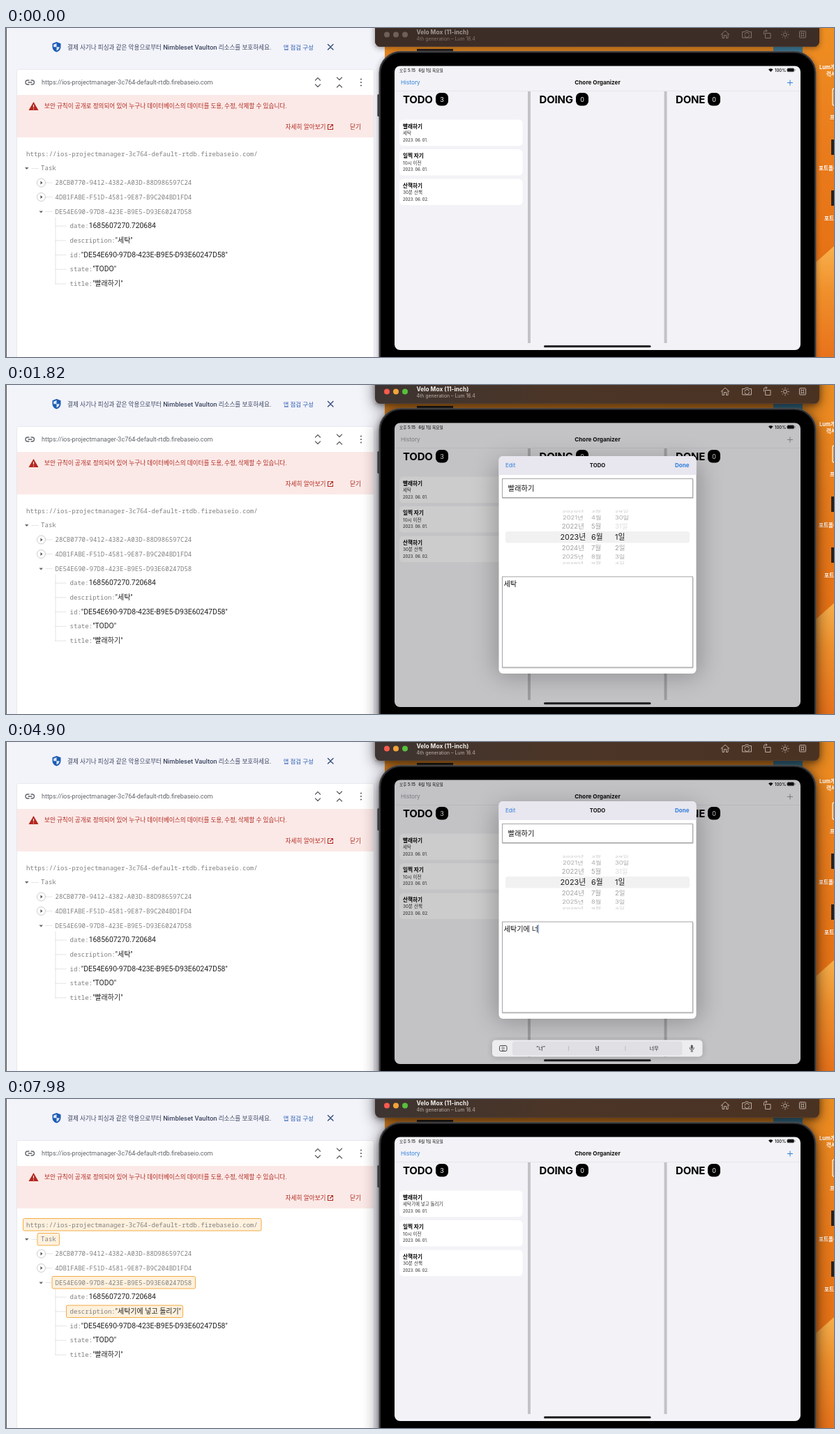
Write an HTML page that moves like this. It is 1187x472 px and loops after 8000 ms.

```html
<!DOCTYPE html>
<html lang="ko">
<head>
<meta charset="utf-8">
<title>Task sync</title>
<style>
html, body { margin: 0; width: 100%; height: 100%; overflow: hidden; background: #f3f3fa; }
svg { display: block; width: 1187px; height: 472px; }
:root { --spring: linear(0, .06 5%, .2 10%, .35 15%, .49 20%, .71 30%, .845 40%, .918 50%, .959 60%, .99 80%, 1); }
text { font-family: Inter, "Noto Sans CJK KR", "Noto Sans CJK", sans-serif; white-space: pre; }
.web text { font-family: Roboto, "Noto Sans CJK KR", "Noto Sans CJK", sans-serif; }
.web .mono { font-family: "Noto Sans Mono", "Liberation Mono", monospace; font-size: 9.07px; fill: #808080; }
.b { font-weight: 700; }
.m { font-weight: 500; }
.mid { text-anchor: middle; }
.line { fill: none; stroke-linecap: round; stroke-linejoin: round; }
.anim { animation: 8s linear infinite; }
.idle { animation-name: idle; }
.awake { animation-name: awake; }
.heading { animation-name: heading; }
.sheet { animation-name: sheet; }
.dim { animation-name: dim; }
.tint { animation-name: tint; }
.keys { animation-name: keys; }
.caret { animation-name: caret; }
.flash { animation-name: flash; }
.done { animation-name: done; }
@keyframes idle { 0%, .8% { opacity: 1; } 1.7%, 100% { opacity: 0; } }
@keyframes awake { 0%, .8% { opacity: 0; } 1.7%, 100% { opacity: 1; } }
@keyframes heading { 0%, .8% { opacity: .55; } 1.7%, 100% { opacity: 1; } }
@keyframes sheet {
  0% { transform: translateY(365px); }
  14.44% { transform: translateY(365px); animation-timing-function: var(--spring); }
  22.56% { transform: translateY(0); }
  38.9% { transform: translateY(0); animation-timing-function: var(--spring); }
  47% { transform: translateY(-17px); }
  95% { transform: translateY(-17px); animation-timing-function: var(--spring); }
  99.7%, 100% { transform: translateY(385px); }
}
@keyframes dim {
  0% { opacity: 0; }
  14.44% { opacity: 0; animation-timing-function: var(--spring); }
  22.56% { opacity: 1; }
  95% { opacity: 1; animation-timing-function: var(--spring); }
  99.7%, 100% { opacity: 0; }
}
@keyframes tint {
  0% { color: #2f7fdc; }
  14.44% { color: #2f7fdc; animation-timing-function: var(--spring); }
  20% { color: #98989d; }
  95% { color: #98989d; animation-timing-function: var(--spring); }
  99.7%, 100% { color: #2f7fdc; }
}
@keyframes keys {
  0% { transform: translateY(42px); }
  38.9% { transform: translateY(42px); animation-timing-function: var(--spring); }
  47% { transform: translateY(0); }
  95% { transform: translateY(0); animation-timing-function: var(--spring); }
  99.7%, 100% { transform: translateY(42px); }
}
@keyframes caret {
  0%, 39% { opacity: 0; }
  39.6%, 84.2% { opacity: 1; }
  86.8%, 89.5% { opacity: 0; }
  91%, 100% { opacity: 1; }
}
@keyframes flash { 0%, 97.99% { opacity: 0; } 98%, 100% { opacity: 1; } }
@keyframes done { 0%, 92.74% { opacity: 1; } 92.75%, 100% { opacity: .4; } }
</style>
</head>
<body>
<svg viewBox="0 0 1187 472">
  <defs>
    <linearGradient id="sky" x2="0" y2="1">
      <stop offset="0" stop-color="#ee8f22"/><stop offset=".35" stop-color="#ea7c1c"/><stop offset="1" stop-color="#e2690f"/>
    </linearGradient>
    <linearGradient id="ridge" x2="0" y2="1">
      <stop offset="0" stop-color="#f8b04c"/><stop offset=".4" stop-color="#f0902c"/><stop offset="1" stop-color="#e8721a"/>
    </linearGradient>
    <linearGradient id="bar">
      <stop offset="0" stop-color="#3d3431"/><stop offset=".4" stop-color="#4b3527"/><stop offset="1" stop-color="#4a3222"/>
    </linearGradient>
    <clipPath id="screen"><rect x="557" y="54.5" width="582" height="407.5" rx="8"/></clipPath>
    <filter id="blur" x="-20%" y="-20%" width="140%" height="140%"><feGaussianBlur stdDeviation="11"/></filter>
    <filter id="soft" x="-20%" y="-20%" width="140%" height="140%"><feGaussianBlur stdDeviation="4"/></filter>
    <filter id="wide" x="-30%" y="-30%" width="160%" height="160%"><feGaussianBlur stdDeviation="16"/></filter>
  </defs>

  <!-- desktop -->
  <rect x="540" width="647" height="472" fill="url(#sky)"/>
  <path d="M1187 313 1160 337V472H1187Z" fill="url(#ridge)"/>
  <path d="M589 30H641V36H589ZM1183 160H1187V182H1183ZM1183 233H1187V255H1183Z" fill="#26221f"/>
  <rect x="1100" y="26" width="42" height="10" fill="#3f7f9c"/>
  <rect x="1185" y="87" width="14" height="24" rx="2" fill="#d8822e" stroke="#f5e8dc" stroke-width="1.5"/>
  <g class="b" font-size="7.6" fill="#fff">
    <text x="1166" y="59">Lum개발</text><text x="1176" y="69">력서</text>
    <text x="1181" y="131">프로</text><text x="1165" y="204">포트폴리오</text><text x="1173" y="276">포트</text>
  </g>

  <!-- browser -->
  <g class="web">
    <rect width="543" height="472" fill="#f3f3fa"/>
    <rect width="1" height="472" fill="#5b5b62"/>
    <rect x="15.5" y="59.5" width="512" height="420" rx="3" fill="#fff" stroke="#e8e8ee"/>
    <path d="M72.500 20 78.500 22.300V27C78.500 30.800 76 33.400 72.500 34.500 69 33.400 66.500 30.800 66.500 27V22.300Z" fill="#1c5cb4"/>
    <path d="M72.500 22V27.200H76.800C76.400 29.800 74.800 31.700 72.500 32.600V27.200H68.200V23.700Z" fill="#dbe7f8"/>
    <text x="88" y="30.500" font-size="8.600" fill="#3c4760">결제 사기나 피싱과 같은 악용으로부터 <tspan class="m" font-size="9.400">Nimbleset Vaulton</tspan> 리소스를 보호하세요.</text>
    <text x="397.500" y="30.500" font-size="8.500" class="m" fill="#2a5cb0">앱 점검 구성</text>
    <path class="line" d="M461.500 23.500 469 31M469 23.500 461.500 31" stroke="#2b4672" stroke-width="1.300"/>

    <g class="line" stroke="#5f6368" stroke-width="1.300">
      <path d="M33 75H31A3 3 0 0 0 31 81H33M36 75H37.500A3 3 0 0 1 37.500 81H36M32 78H37"/>
      <path d="M443.500 75 447 71.500 450.500 75M443.500 81 447 84.500 450.500 81M474.500 71 478 74.500 481.500 71M474.500 85 478 81.500 481.500 85"/>
    </g>
    <path d="M509 73.500V73.510M509 78V78.010M509 82.500V82.510" stroke="#5f6368" stroke-width="2.200" stroke-linecap="round"/>
    <text x="51" y="81" font-size="9" fill="#5f6368">https://ios-projectmanager-3c764-default-rtdb.firebaseio.com</text>

    <rect x="16" y="96" width="511" height="61" fill="#fbe9e7"/>
    <path d="M39.500 106 46.500 118H32.500Z" fill="#b3261e"/>
    <path d="M39.500 110V114M39.500 115.500V116.700" stroke="#fbe9e7" stroke-width="1.200"/>
    <g fill="#b0281f">
      <text x="55" y="114.500" font-size="8.600">보안 규칙이 공개로 정의되어 있어 누구나 데이터베이스의 데이터를 도용, 수정, 삭제할 수 있습니다.</text>
      <text x="400.500" y="144.500" font-size="8.700" class="m">자세히 알아보기</text>
      <text x="493" y="144.500" font-size="8.700" class="m">닫기</text>
    </g>
    <path class="line" d="M464 138.500H461.500V145.500H468.500V143M466 138.500H468.500V141M468.300 138.700 464.500 142.500" stroke="#b0281f" stroke-width="1.100"/>

    <g class="anim flash" fill="#fef1de" stroke="#f2ab44">
      <rect x="24.500" y="171.500" width="341.500" height="17.500" rx="2"/>
      <rect x="45" y="192.500" width="31.500" height="17.500" rx="2"/>
      <rect x="66" y="254.500" width="205.500" height="17.500" rx="2"/>
      <rect x="86.500" y="296" width="167" height="17.500" rx="2"/>
    </g>
    <g class="line" stroke="#d8d8d8" stroke-width=".8" stroke-dasharray="1 1">
      <path d="M37 201.500H46M57 222H66M57 242.500H66M57 263.500H66M71 272V367"/>
      <path id="twigs"/>
    </g>
    <path d="M27 200H32.500L29.750 203ZM47.500 262.500H53L50.250 265.500Z" fill="#666"/>
    <g fill="#fff" stroke="#c9c9c9"><circle cx="50.500" cy="222" r="6"/><circle cx="50.500" cy="242.500" r="6"/></g>
    <path d="M49.500 219.500V224.500L52.500 222ZM49.500 240V245L52.500 242.500Z" fill="#555"/>
    <g id="tree"></g>
  </g>

  <!-- simulator window -->
  <g filter="url(#soft)" opacity=".4"><rect x="535" y="36" width="626" height="470" rx="30"/><rect x="529" y="-20" width="637" height="49" rx="8"/></g>
  <g class="anim awake"><g filter="url(#blur)" opacity=".5"><rect x="533" y="40" width="630" height="480" rx="30"/><rect x="529" y="-20" width="637" height="52" rx="8"/></g></g>
  <rect x="532.500" y="95" width="5" height="32" rx="1.500" fill="#2c2c2e"/>
  <rect x="536" y="34.500" width="624" height="480" rx="30" fill="#000" stroke="#303033" stroke-width="2.500"/>
  <rect x="534.800" y="33.300" width="626.400" height="480" rx="31" fill="none" stroke="#6a6a6e" stroke-width=".6"/>
  <rect x="529" y="-20" width="637" height="47" rx="8" fill="url(#bar)"/>
  <g><circle cx="546" cy="9.500" r="4" fill="#fb5a50"/><circle cx="559" cy="9.500" r="4" fill="#f2a33a"/><circle cx="572" cy="9.500" r="4" fill="#58c03c"/></g>
  <g class="anim idle">
    <rect x="529" y="-20" width="637" height="47" rx="8" fill="#3d2d27"/>
    <g fill="#6d5f59"><circle cx="546" cy="9.500" r="4"/><circle cx="559" cy="9.500" r="4"/><circle cx="572" cy="9.500" r="4"/></g>
  </g>
  <path d="M529 26.700H1166" stroke="#7a6252" stroke-width=".6" opacity=".5"/>
  <g class="anim heading">
    <text x="588.500" y="8.500" font-size="8.400" class="b" fill="#f4f0ee">Velo Mox (11-inch)</text>
    <text x="588.500" y="17.500" font-size="6.900" fill="#bcb0aa">4th generation – Lum 16.4</text>
    <g class="line" stroke="#bcada4" stroke-width="1">
      <path d="M1025 9.500 1031 4 1037 9.500M1027 8.500V14.500H1029.500V10.500H1032.500V14.500H1035V8.500"/>
      <path d="M1056 5.500H1059L1060 4H1064L1065 5.500H1068.500V14H1056ZM1059 9A3.300 3.300 0 0 1 1065.300 8.500M1065.500 10.500A3.300 3.300 0 0 1 1059 11"/>
      <path d="M1089 7.500H1096V14.500H1089ZM1086.500 9V5.500Q1086.500 4 1088 4H1091M1089.500 2.500 1091 4 1089.500 5.500"/>
      <circle cx="1117" cy="9.500" r="2.500"/>
      <path d="M1117 4V5M1117 14V15M1111.500 9.500H1112.500M1121.500 9.500H1122.500M1113 5.500 1113.700 6.200M1121 5.500 1120.300 6.200M1113 13.500 1113.700 12.800M1121 13.500 1120.300 12.800"/>
      <rect x="1137.500" y="4.500" width="9" height="9.500" rx="1"/>
      <path d="M1140.500 7.500H1143.500V11H1140.500ZM1139.500 6.500H1140.500V7.500M1144.500 6.500H1143.500V7.500M1139.500 12H1140.500V11M1144.500 12H1143.500V11" stroke-width=".8"/>
    </g>
  </g>

  <!-- device screen -->
  <g clip-path="url(#screen)">
    <rect x="557" y="54" width="582" height="409" fill="#f3f3f7"/>
    <text x="564" y="62.500" font-size="5.700" class="m" fill="#111">오후 5:15   6월 1일 목요일</text>
    <path d="M1093 59.500Q1096.300 56.800 1099.600 59.500L1096.300 63Z" fill="#111"/>
    <text x="1102" y="62.600" font-size="6" class="m" fill="#111">100%</text>
    <rect x="1119.800" y="57.800" width="10" height="5" rx="1.500" fill="#111" stroke="#777" stroke-width=".6"/>
    <rect x="1130.600" y="59.300" width=".9" height="2" fill="#777"/>
    <text x="848" y="81.300" font-size="8.200" class="b mid" fill="#111">Chore Organizer</text>
    <g class="anim tint" fill="currentColor" stroke="none">
      <text x="566" y="81.300" font-size="8.200">History</text>
      <path d="M1120 78.500H1128M1124 74.500V82.500" stroke="currentColor"/>
    </g>
    <path d="M557 90.500H1139" stroke="#dedee2" stroke-width=".6"/>
    <path d="M750 91V452M945.500 91V452" stroke="#c3c3c6" stroke-width="4"/>
    <g id="columns"></g>
    <g id="cards"></g>
    <rect class="anim dim" x="557" y="54" width="582" height="409" fill-opacity=".2"/>

    <g class="anim sheet">
      <rect class="anim dim" x="700" y="108" width="296" height="312" rx="20" filter="url(#wide)" fill-opacity=".24"/>
      <rect x="706.500" y="102" width="283" height="312" rx="6" fill="#fff"/>
      <path d="M706.500 129V108Q706.500 102 712.500 102H983.500Q989.500 102 989.500 108V129Z" fill="#e8e6ee"/>
      <text x="716" y="118.400" font-size="8" fill="#2f7fdc">Edit</text>
      <text x="848" y="118.400" font-size="7.700" class="b mid" fill="#111">TODO</text>
      <text class="anim done b" x="979.500" y="118.400" font-size="8" text-anchor="end" fill="#2f7fdc">Done</text>
      <g fill="#000" opacity=".2"><rect x="711" y="135" width="274.500" height="28" rx="1"/><rect x="711" y="276" width="274.500" height="130.500" rx="1"/></g>
      <g fill="#fff" stroke="#a4a4a6"><rect x="711.500" y="134.500" width="273" height="27"/><rect x="711.500" y="275" width="273" height="130"/></g>
      <text x="719.500" y="151.500" font-size="10.300" fill="#111">빨래하기</text>
      <rect x="716" y="210" width="264" height="16.500" rx="3.500" fill="#f1f1f2"/>
      <g id="picker"></g>
      <text id="memo" x="713.500" y="288.800" font-size="10.200" fill="#111"></text>
      <rect id="caret" class="anim caret" y="279" width="1" height="12.500" fill="#4f83c9"/>
    </g>

    <g class="anim keys">
      <rect x="697" y="428" width="301.500" height="24.500" rx="6" filter="url(#soft)" opacity=".2"/>
      <rect x="697" y="427.500" width="301.500" height="24" rx="5" fill="#ededf0"/>
      <rect x="726" y="429.500" width="243.500" height="20" rx="4" fill="#dfdfe4"/>
      <path d="M806.500 436V443M888 436V443" stroke="#b4b4ba" stroke-width=".8"/>
      <rect x="707.500" y="435.500" width="10.500" height="8" rx="2" fill="none" stroke="#333" stroke-width=".9"/>
      <text x="712.700" y="441.800" font-size="5.600" class="mid" fill="#333">한</text>
      <rect x="981.700" y="434.500" width="3" height="6" rx="1.500" fill="#555"/>
      <path class="line" d="M980 438.500Q980 442 983.200 442T986.400 438.500M983.200 442V444M981.700 444H984.700" stroke="#444" stroke-width=".8"/>
      <g id="hints" font-size="7.200" class="mid" fill="#222"><text x="766.500" y="442"></text><text x="847.500" y="442"></text><text x="929" y="442"></text></g>
    </g>
    <rect x="771" y="455.300" width="153.500" height="3" rx="1.500" fill="#1c1c1e"/>
  </g>
</svg>

<script>
const $ = id => document.getElementById(id);
const text = (x, y, size, fill, body, rest = '') =>
  `<text x="${x}" y="${y}" font-size="${size}" fill="${fill}" ${rest}>${body}</text>`;
const NOTE = '세탁기에 넣고 돌리기';
const UUID = 'DE54E690-97D8-423E-B9E5-D93E60247D58';

// database tree
const rowY = i => 183.7 + i * 20.7;
const node = (x, i, s) => `<text class="mono" x="${x}" y="${rowY(i)}">${s}</text>`;
const fields = [['date', '1685607270.720684'], ['description', ''], ['id', `"${UUID}"`],
  ['state', '"TODO"'], ['title', '"빨래하기"']];
$('tree').innerHTML =
  node(29, 0, 'https://ios-projectmanager-3c764-default-rtdb.firebaseio.com/') +
  node(50, 1, 'Task') +
  node(70.5, 2, '28CB0770-9412-4382-A03D-88D986597C24') +
  node(70.5, 3, '4DB1FABE-F51D-4581-9E87-B9C204BD1FD4') +
  node(70.5, 4, UUID) +
  fields.map(([key, value], i) => node(91.5, i + 5, key + ':') +
    text(91.5 + 5.44 * (key.length + 1), rowY(i + 5), /[가-힣]/.test(value) || !value ? 10 : 10.4,
      '#212121', value, `id="v-${key}"`)).join('');
$('twigs').setAttribute('d', fields.map((_, i) => `M71 ${rowY(i + 5) - 3}H86`).join(''));

// board
$('columns').innerHTML = [['TODO', 569, 616, 3], ['DOING', 764.5, 817, 0], ['DONE', 960, 1006, 0]]
  .map(([name, x, bx, n]) => text(x, 108, 15, '#000', name, 'class="b" letter-spacing="-.2"') +
    `<rect x="${bx}" y="93" width="18" height="18.500" rx="6.500"/>` +
    text(bx + 9, 105.6, 9, '#fff', n, 'class="mid"')).join('');
$('cards').innerHTML = [['빨래하기', '', '01'], ['일찍 자기', '10시 이전', '01'], ['산책하기', '30분 산책', '02']]
  .map(([name, info, day], i) => `<g transform="translate(0 ${i * 42.5})">
    <rect x="564" y="131.500" width="176.500" height="37.500" rx="5.500" fill="#fff"/>` +
    text(569, 143.6, 7.6, '#000', name, 'class="b"') +
    text(569, 153, 6.5, '#333', info, `id="info${i}"`) +
    text(569, 162.5, 5.8, '#222', `2023. 06. ${day}.`) + '</g>').join('');

// date wheel: offset from the middle, size, flattening, shade
const wheel = [[-37, 9.1, .45, '#c6c6c8'], [-28.500, 9.3, .78, '#a8a8aa'], [-15.500, 9.5, .95, '#a0a0a2'],
  [0, 10.8, 1, '#1c1c1e'], [15, 9.5, .95, '#a0a0a2'], [28, 9.3, .78, '#a8a8aa'], [37.5, 9.1, .45, '#c6c6c8']];
const days = [29, 30, 31, 1, 2, 3, 4];
$('picker').innerHTML = wheel.map(([dy, size, flat, fill], i) =>
  `<g transform="translate(0 ${218.2 + dy}) scale(1 ${flat})">` +
  text(812.8, 3.8, size, fill, `${2020 + i}년`, 'class="mid"') +
  text(839, 3.8, size, fill, `${3 + i}월`) +
  text(873, 3.8, size, days[i] === 31 ? '#dadadc' : fill, `${days[i]}일`) + '</g>').join('');

// typing: time, memo, and word hints when they change
const typing = [
  [0, '세탁', ['', '', '']],
  [4200, '세탁ㄱ', ['“ㄱ”', '그', '것']],
  [4340, '세탁기'],
  [4480, '세탁기에', ['“에”', '에서', '에서는']],
  [4620, '세탁기에 '],
  [4690, '세탁기에 ㄴ'],
  [4900, '세탁기에 너', ['“너”', '넘', '너무']],
  [5040, '세탁기에 넣'],
  [5250, '세탁기에 넣ㄱ', ['“ㄱ”', '그', '그리고']],
  [5460, '세탁기에 넣고', ['“고”', '고기', '고맙다']],
  [5530, '세탁기에 넣고 '],
  [5600, '세탁기에 넣고 ㄷ', ['“ㄷ”', '더', '다']],
  [5740, '세탁기에 넣고 도'],
  [5810, '세탁기에 넣고 돌'],
  [5950, '세탁기에 넣고 돌ㄹ', ['“돌ㄹ”', '돌려', '돌림']],
  [6090, '세탁기에 넣고 돌리', ['“돌리”', '돌리고', '돌리는']],
  [6160, '세탁기에 넣고 돌릭'],
  [6230, NOTE, ['“돌리기”', '돌리길', '돌리긴']]
];
const put = (el, s) => { if (el.textContent !== s) el.textContent = s; };
const memo = $('memo'), hints = $('hints').children;
let start;

function draw(now) {
  start ??= now;
  const t = (now - start) % 8000;
  const past = typing.filter(k => k[0] <= t);
  put(memo, past.at(-1)[1].replace(/ /g, '\u00a0'));
  $('caret').setAttribute('x', 713 + memo.getComputedTextLength());
  past.findLast(k => k[2])[2].forEach((s, i) => put(hints[i], s));
  put($('info0'), t < 7700 ? '세탁' : NOTE);
  put($('v-description'), `"${t < 7840 ? '세탁' : NOTE}"`);
  requestAnimationFrame(draw);
}
requestAnimationFrame(draw);
</script>
</body>
</html>
```
